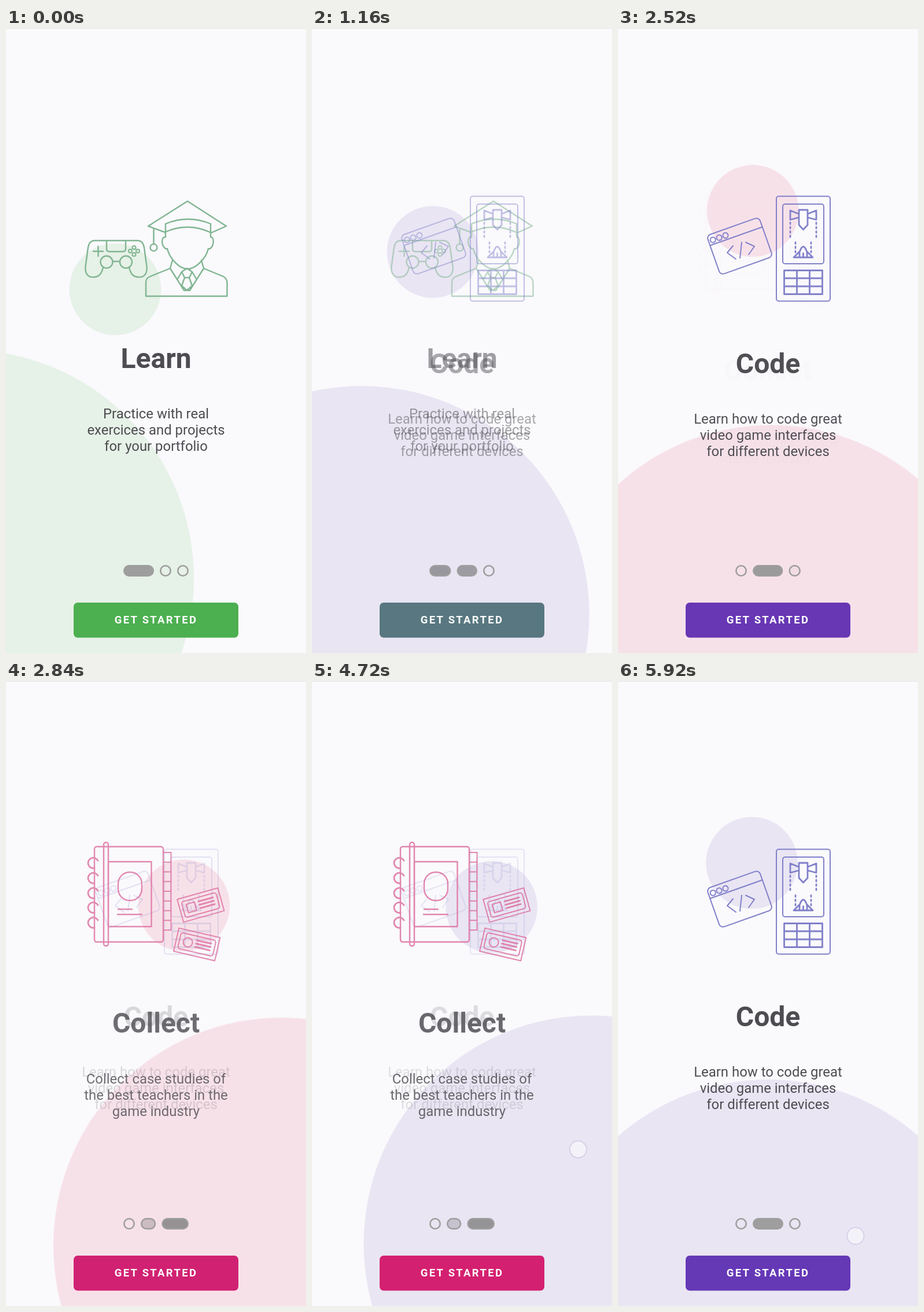
Write an HTML page that moves like this. It is 519 px wide and 1079 px high and loops after 5.96 s.

```html
<!DOCTYPE html>
<html lang="en">
<head>
<meta charset="utf-8">
<title>Onboarding</title>
<style>
html, body { margin: 0; width: 100%; height: 100%; overflow: hidden; background: #faf9fc; }
svg { display: block; width: 100%; height: 100%; font-family: Roboto, sans-serif; }
.art { fill: none; stroke-width: 2.4; stroke-linejoin: round; stroke-linecap: round; }
.thin { stroke-width: 2; }
.bold { stroke-width: 2.8; }
.title { font-size: 48px; font-weight: 700; }
.body { font-size: 23.9px; }
.copy { fill: #4d4c51; text-anchor: middle; }
.cta { font-size: 18.5px; font-weight: 700; letter-spacing: 2.3px; fill: #fff; }
</style>
</head>
<body>
<svg viewBox="0 0 519 1079" preserveAspectRatio="none">
  <defs>
    <g id="card">
      <rect x="-36.5" y="-20.5" width="73" height="41"/>
      <rect x="-31" y="-14" width="62" height="28" rx="4"/>
      <path class="bold" d="M-2 -7H24M-2 -1H24M-2 5H24"/>
    </g>
  </defs>
  <rect width="519" height="1079" fill="#faf9fc"/>
  <rect width="519" height="1" fill="#e2e1e4"/>
  <circle id="big" r="394"/>
  <circle id="small" r="79.3"/>

  <g class="page">
    <g class="art" stroke="#80b592">
      <path d="M152 367C145 368 143 373 142 379L138 408C135 424 142 431 152 430C162 430 166 423 168 413M152 367H229C236 368 238 373 239 379L243 408C246 424 239 431 229 430C219 430 215 423 213 413M184.500 403H196.500"/>
      <circle cx="174" cy="404" r="10.500"/><circle cx="207.500" cy="404" r="10.500"/>
      <path d="M174 367V381Q174 386 179 386H202Q207 386 207 381V367M151 385.500H168M159.500 377V394"/>
      <g class="thin">
        <circle cx="221.500" cy="379" r="3"/><circle cx="221.500" cy="391" r="3"/>
        <circle cx="215" cy="385" r="3"/><circle cx="228" cy="385" r="3"/>
      </g>
      <path d="M276 353L246 342L314 299L381 342L354 354M276 338Q315 322 354 338V353Q315 335 276 352ZM255.500 347V373"/>
      <circle cx="255.500" cy="379" r="6"/>
      <path d="M276 352V361C268 360 269 374 274 379Q276 382 279 381C283 398 300 416 314 416C328 416 346 398 350 381Q353 382 355 379C360 374 360 360 354 361V352"/>
      <path d="M288 401L284 415L249 429Q242 432 242 439V463H382.500V439Q382 432 376 429L342 415L338 401M284 415L308 453H318L342 415M304 421L313 415L322 421L317 431H309ZM309 431L304 445L313 453L322 445L317 431M304 421L297 433M322 421L329 433"/>
    </g>
    <g class="copy">
      <text class="title" x="259.500" y="587">Learn</text>
      <text class="body" y="673.500"><tspan x="259.500">Practice with real</tspan><tspan x="259.500" dy="28">exercices and projects</tspan><tspan x="259.500" dy="28">for your portfolio</tspan></text>
    </g>
  </g>

  <g class="page">
    <g class="art" stroke="#8080ca">
      <g class="thin">
        <g transform="translate(210.500 376.500) rotate(-19.500)">
          <rect x="-48" y="-36" width="96" height="72" rx="7"/>
          <path d="M-48 -18H48"/>
          <circle cx="-40" cy="-25.500" r="4.600"/><circle cx="-28.500" cy="-25.500" r="4.600"/><circle cx="-17" cy="-25.500" r="4.600"/>
        </g>
        <path d="M199 376L189 388L204 399M214 370L211 397M221 370L236 377L226 391"/>
        <rect x="274" y="290.500" width="93" height="181" rx="4"/>
        <rect x="285" y="304" width="71" height="103" rx="4"/>
      </g>
      <g class="bold">
        <path d="M287.500 418.500H353.500V459.500H287.500ZM287.500 432H353.500M287.500 446H353.500M309.500 418.500V459.500M331.500 418.500V459.500"/>
        <path d="M313 314H328V340L320.500 348L313 340ZM313 321L298 315V331L313 327M328 321L343 315V331L328 327"/>
        <path d="M314 396V387Q320.500 368 327 387V396M304 396H337M314 386L305 395M327 386L336 395M320.500 389V396"/>
        <path stroke-dasharray="2.500 5" d="M298 336V362M343 336V362M307 370V390M334 370V390"/>
      </g>
    </g>
    <g class="copy">
      <text class="title" x="259.500" y="596">Code</text>
      <text class="body" y="682.500"><tspan x="259.500">Learn how to code great</tspan><tspan x="259.500" dy="28">video game interfaces</tspan><tspan x="259.500" dy="28">for different devices</tspan></text>
    </g>
  </g>

  <g class="page">
    <g class="art" stroke="#dd6f9f">
      <rect x="153" y="286" width="119" height="164.500" rx="4"/>
      <rect x="169" y="278.500" width="8" height="179" rx="4"/>
      <rect x="177" y="312" width="74.500" height="112"/>
      <path id="rings" class="bold"/>
      <path id="tabs" class="thin"/>
      <rect x="194" y="330" width="41" height="49" rx="20"/>
      <path d="M194 394H218M193 403H235"/>
      <g class="thin">
        <g transform="translate(336.800 386.800) rotate(-15.700)"><use href="#card"/><rect x="-24" y="-8" width="15" height="15"/></g>
        <g transform="translate(330.200 454.800) rotate(13)"><use href="#card"/><circle cx="-16" r="8"/></g>
      </g>
    </g>
    <g class="copy">
      <text class="title" x="259.500" y="607">Collect</text>
      <text class="body" y="694.500"><tspan x="259.500">Collect case studies of</tspan><tspan x="259.500" dy="28">the best teachers in the</tspan><tspan x="259.500" dy="28">game industry</tspan></text>
    </g>
  </g>

  <g stroke="#9e9e9e" stroke-width="2.600">
    <rect class="dot" y="928.300" height="17.400" rx="8.700"/>
    <rect class="dot" y="928.300" height="17.400" rx="8.700"/>
    <rect class="dot" y="928.300" height="17.400" rx="8.700"/>
  </g>
  <rect id="button" x="117" y="992" width="285" height="60.500" rx="7"/>
  <text class="cta" x="187.800" y="1027.500">GET STARTED</text>
  <circle id="finger" r="14.500" fill="#fff" fill-opacity=".5" stroke="#c9c3e0" stroke-opacity=".8" stroke-width="1.500"/>
</svg>
<script>
const LOOP = 5960, STEP = 40, SLIDE = 500;
const $ = id => document.getElementById(id);
const all = s => [...document.querySelectorAll(s)];
const pages = all('.page'), dots = all('.dot');

const looks = [
  { big: [-69, 950], small: [189, 451], tint: '#e6f1e7', button: [76, 175, 80] },
  { big: [260, 1082], small: [231.5, 314], tint: '#e9e5f3', button: [101, 56, 182] },
  { big: [527, 950], small: [326, 405], tint: '#f7e1e9', button: [234, 27, 98] }
];
const slides = [
  { start: 920, from: 0, to: 1 },
  { start: 2480, from: 1, to: 2 },
  { start: 4592, from: 2, to: 1 }
];
const touches = [
  { start: 4600, end: 4800, from: [383, 850], to: [512, 781] },
  { start: 5800, end: 5960, from: [407, 960], to: [412.3, 957.3] }
];

$('rings').setAttribute('d', [314, 340, 366, 391, 417].map(y => `M159 ${y - 4}A9 9 0 1 0 153 ${y + 9}`).join(''));
$('tabs').setAttribute('d', 'M272 296H285.5V430H272' +
  Array.from({ length: 7 }, (_, i) => `M272 ${296 + 16.75 * (i + 1)}H285.5`).join(''));

const set = (el, attrs) => { for (const k in attrs) el.setAttribute(k, attrs[k]); };
const mix = (a, b, k) => a.map((v, i) => v + (b[i] - v) * k);
const place = (el, [cx, cy]) => set(el, { cx, cy });
const clamp = k => Math.min(1, Math.max(0, k));
const ease = k => k * k * (3 - 2 * k);

function draw(t) {
  let pos = 0, target = 0;
  for (const s of slides) if (t >= s.start) {
    pos = s.from + (s.to - s.from) * ease(clamp((t - s.start) / SLIDE));
    target = s.to;
  }
  const i = Math.min(1, Math.floor(pos)), k = pos - i;
  const blend = key => mix(looks[i][key], looks[i + 1][key], k);

  place($('big'), blend('big'));
  place($('small'), blend('small'));
  for (const id of ['big', 'small']) set($(id), { fill: looks[target].tint });
  set($('button'), { fill: `rgb(${blend('button').map(Math.round)})` });

  let x = 203;
  dots.forEach((dot, n) => {
    const on = clamp(1 - Math.abs(pos - n)), w = 20 + 33 * on, g = Math.round(158 * on);
    set(pages[n], { opacity: on });
    set(dot, { x: x + 1.3, width: w - 2.6, fill: `rgb(${g},${g},${g})`, 'fill-opacity': on });
    x += w + 10;
  });

  const touch = touches.find(c => t >= c.start && t < c.end);
  set($('finger'), { visibility: touch ? 'visible' : 'hidden' });
  if (touch) place($('finger'), mix(touch.from, touch.to, (t - touch.start) / (touch.end - touch.start)));
}

const began = performance.now();
function tick() {
  const t = (performance.now() - began) % LOOP;
  draw(Math.floor(t / STEP) * STEP);
  requestAnimationFrame(tick);
}
tick();
</script>
</body>
</html>
```
